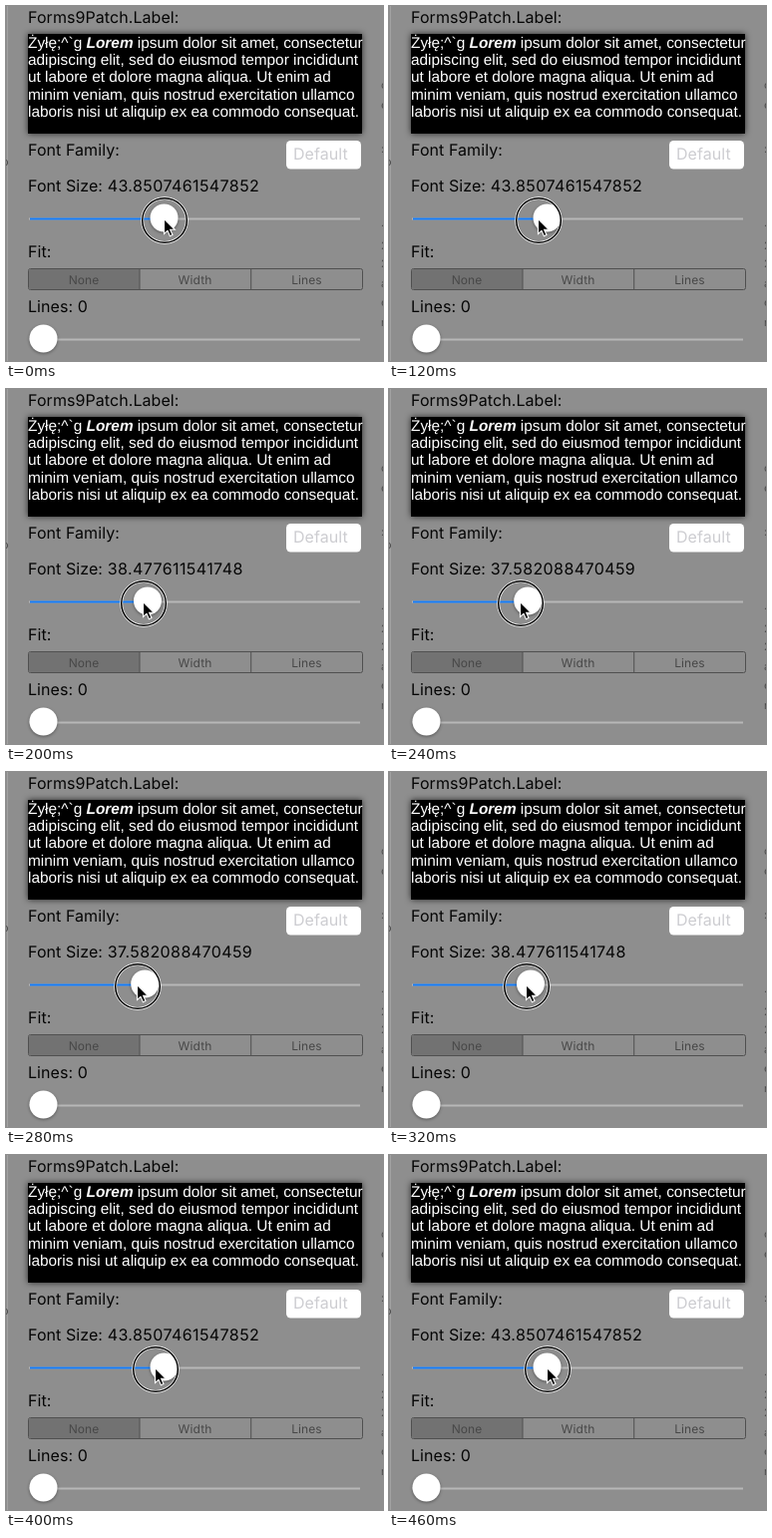
An HTML page that plays this animation: 378x356 px, repeating every 0.52 s.

```html
<!DOCTYPE html>
<html lang="en">
<head>
<meta charset="utf-8">
<style>
  html, body { margin: 0; width: 100%; height: 100%; overflow: hidden; background: #8e8e8e; }
  svg { display: block; }
  text { font: 16px Inter, sans-serif; letter-spacing: .07px; fill: #050505; white-space: pre; text-rendering: geometricPrecision; }
  #size { letter-spacing: .41px; }
  .label text { font: 15.4px "Liberation Sans", Arial, sans-serif; letter-spacing: 0; fill: #fff; }
  .segments text { font: 12px Inter, sans-serif; letter-spacing: .1px; fill: #484848; text-anchor: middle; }
  .edge text { font-size: 11px; fill: #4c4c4c; }
  .lorem { font-weight: bold; font-style: italic; }
  .thumb { fill: #fff; filter: drop-shadow(0 1.5px 1.5px #0006); }
  .track { stroke: #b7b7b7; stroke-width: 2; }
</style>
</head>
<body>
<svg width="378" height="356" viewBox="0 0 378 356">
  <rect width="378" height="356" fill="#8e8e8e"/>
  <path d="M1.5 0V356" stroke="#a2a2a2"/>
  <g class="edge">
    <text x="-4" y="160">o</text>
    <text x="376" y="83">c</text>
    <text x="376" y="103">e</text>
    <text x="376" y="147">:</text>
    <text x="376" y="221">.</text>
    <text x="376" y="244">2</text>
    <text x="376" y="262">2</text>
    <text x="376" y="282">a</text>
    <text x="376" y="301">e</text>
    <text x="376" y="321">n</text>
  </g>

  <text x="22" y="17">Forms9Patch.Label:</text>
  <g class="label">
    <rect x="22" y="28" width="335" height="100" style="filter: drop-shadow(0 0 3px #000b)"/>
    <text x="22" y="42">Żyłę;^`g <tspan class="lorem">Lorem</tspan> ipsum dolor sit amet, consectetur</text>
    <text x="22" y="59.2">adipiscing elit, sed do eiusmod tempor incididunt</text>
    <text x="22" y="76.4">ut labore et dolore magna aliqua. Ut enim ad</text>
    <text x="22" y="93.6">minim veniam, quis nostrud exercitation ullamco</text>
    <text x="22" y="110.8">laboris nisi ut aliquip ex ea commodo consequat.</text>
  </g>

  <text x="22" y="150">Font Family:</text>
  <rect x="281" y="135" width="75" height="28.5" rx="4.5" fill="#fff"/>
  <text x="288" y="154" style="fill: #cdcdd1">Default</text>

  <text x="22" y="186">Font Size:</text>
  <text x="101.7" y="186" id="size"></text>
  <path class="track" d="M23 213.5H355"/>
  <path id="fill" stroke="#147cf8" stroke-width="2"/>
  <circle class="thumb" id="thumb" cy="212.5" r="14"/>

  <text x="22" y="252">Fit:</text>
  <g class="segments">
    <rect x="22.5" y="263.5" width="335" height="21" rx="2" fill="none" stroke="#505050"/>
    <rect x="23" y="264" width="111" height="20" fill="#727272"/>
    <path d="M134 264V284M245.7 264V284" stroke="#505050"/>
    <text x="78" y="279">None</text>
    <text x="189.5" y="279">Width</text>
    <text x="301.5" y="279">Lines</text>
  </g>

  <text x="22" y="307">Lines: 0</text>
  <path class="track" d="M23 334.5H355"/>
  <circle class="thumb" cx="37.5" cy="333.5" r="14"/>

  <g id="pointer">
    <circle r="22.3" fill="none" stroke="#fff" stroke-width="2.8"/>
    <circle r="22.3" fill="none" stroke="#000" stroke-width="1.5"/>
    <path d="M-.5 -1.5V13.5L3 10.3L5.4 15.7L8 14.5L5.6 9.3H10.3Z" stroke="#fff" stroke-width="1.1"/>
  </g>
</svg>
<script>
  const LOOP = 520, STEP = 20, START = 60, TURN = 10;
  // The drag runs to the left, then plays backwards.
  const pointerX = [159, 156, 153, 150, 146, 141, 140, 138, 135, 132, 130];
  const sliderSteps = [267, 267, 267, 267, 260, 254, 243, 231, 228, 225, 222];
  const $ = id => document.getElementById(id);

  function draw(now) {
    const tick = Math.floor((now % LOOP - START) / STEP);
    const pose = Math.max(0, TURN - Math.abs(tick - TURN));
    const steps = sliderSteps[pose];
    const size = Math.fround(4 + steps * 10 / 67);
    const x = 35.7 + steps * 0.46;

    $("size").textContent = Number(size.toPrecision(15));
    $("fill").setAttribute("d", `M24 213.5H${x}`);
    $("thumb").setAttribute("cx", x);
    $("pointer").setAttribute("transform", `translate(${pointerX[pose]} 215)`);
  }

  function loop(now) {
    draw(now);
    requestAnimationFrame(loop);
  }
  draw(0);
  requestAnimationFrame(loop);
</script>
</body>
</html>
```
